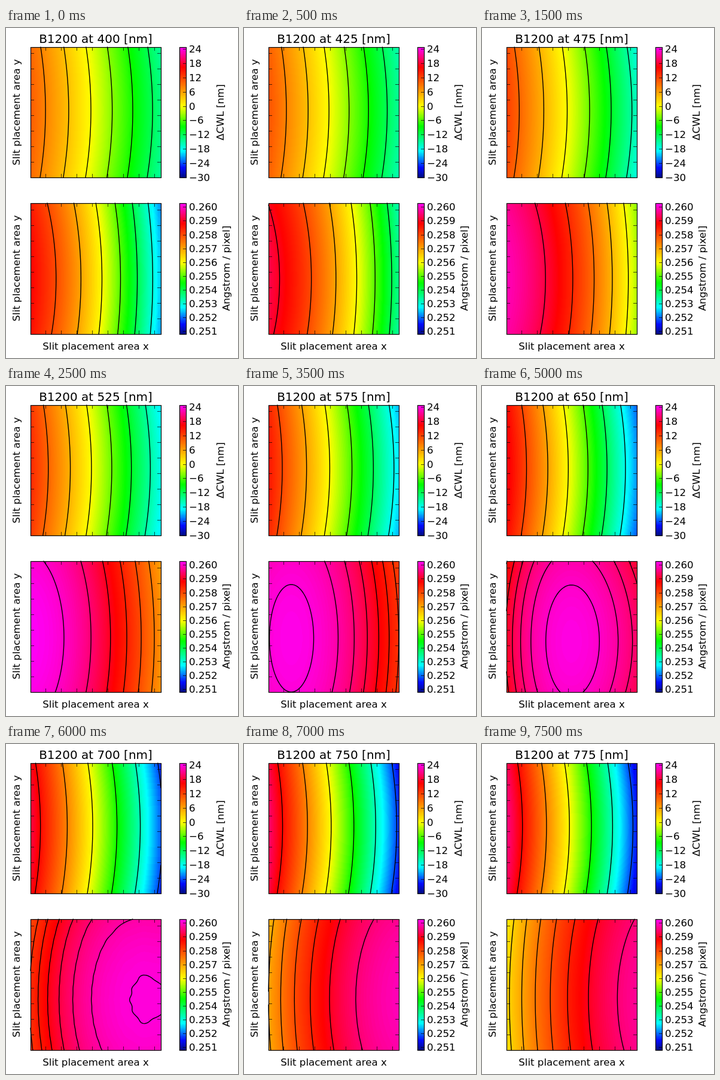
Animation, 388 px wide and 552 px high, one loop 8000 ms. Source, as an HTML page with a canvas:

```html
<!DOCTYPE html>
<html>
<head>
<meta charset="utf-8">
<style>
html, body { margin: 0; width: 100%; height: 100%; overflow: hidden; background: #fff; }
canvas { display: block; }
</style>
</head>
<body>
<canvas id="stage" width="388" height="552"></canvas>
<script>
const ctx = document.getElementById('stage').getContext('2d');
const LEFT = 41, WIDTH = 218, FONT = '"DejaVu Sans", Verdana, sans-serif';

// colour map: position, red, green, blue
const STOPS = [
  [0, 0, 12, 128], [.075, 0, 10, 255], [.205, 0, 255, 255], [.39, 0, 255, 0],
  [.545, 255, 255, 0], [.845, 255, 0, 0], [1, 255, 0, 250]
];

// dispersion model: wavelength, peak, peak x, peak y, then
// quadratic x, cubic x, quadratic y and ripple strengths
const MODEL = [
  [400, .26003, -104, 420, 5.76e-8, 0, 1.9e-8, 0],
  [475, .26011, -17, 420, 6e-8, 0, 1.5e-8, 0],
  [525, .260284, 31, 421, 6.8e-8, 4.1e-11, 1.32e-8, 0],
  [575, .260193, 79, 422, 6.8e-8, 5.25e-11, 1.15e-8, 0],
  [650, .260155, 149.6, 427, 7.8e-8, 1.48e-10, 1.75e-8, 0],
  [700, .260125, 235, 427, 3e-8, 9e-11, 1.7e-8, 2e-6],
  [775, .25984, 311, 425, 4.75e-8, 0, 1.1e-8, 0]
];

// linear interpolation in rows keyed by their first entry
function lookup(rows, key) {
  let i = 1;
  while (i < rows.length - 1 && rows[i][0] < key) i++;
  const a = rows[i - 1], b = rows[i];
  const t = Math.max(0, Math.min(1, (key - a[0]) / (b[0] - a[0])));
  return a.slice(1).map((v, j) => v + (b[j + 1] - v) * t);
}

const PALETTE = Array.from({ length: 256 }, (_, i) => lookup(STOPS, i / 255));

function shiftField(nm) {
  const t = (nm - 400) / 375, x0 = 142 + 2 * t + 2.2 * t * t;
  return (x, y) => {
    const u = x - x0 + .00072 * (y - 138) ** 2;
    return -.000275 * nm * (u + .00056 * u * u);
  };
}

function dispersionField(nm) {
  const [peak, px, py, q, c, p, r] = lookup(MODEL, nm);
  return (x, y) => {
    const w = x - px;
    return peak - q * w * w + c * w ** 3 - p * (y - py) ** 2
      + r * (Math.cos((x - 228) / 5) + Math.cos((y - 428) / 3.2));
  };
}

const PANELS = [
  { top: 32, height: 218, lo: -30, hi: 25, field: shiftField, first: -30, gap: 6,
    digits: 0, label: 'ΔCWL [nm]', labelX: 364, ticks: 42 },
  { top: 293, height: 219, lo: .2508, hi: .2603, field: dispersionField, first: .251, gap: .001,
    digits: 3, label: 'Angstrom / pixel]', labelX: 374, ticks: 304 }
];

function text(str, x, y, size = 16.67, align = 'center', turn = 0) {
  ctx.save();
  ctx.translate(x, y);
  ctx.rotate(turn);
  ctx.font = `${size}px ${FONT}`;
  ctx.textAlign = align;
  ctx.fillStyle = '#000';
  ctx.fillText(str, 0, 0);
  ctx.restore();
}

function line(x1, y1, x2, y2) {
  ctx.moveTo(x1, y1);
  ctx.lineTo(x2, y2);
}

function paint(x, w, value, { top, height, lo, hi }) {
  const img = ctx.createImageData(w, height);
  for (let j = 0, n = 0; j < height; j++) {
    for (let i = 0; i < w; i++) {
      const f = (value(x + i + .5, top + j + .5) - lo) / (hi - lo);
      const rgb = PALETTE[Math.max(0, Math.min(255, Math.round(f * 255)))];
      for (const v of rgb) img.data[n++] = v;
      img.data[n++] = 255;
    }
  }
  ctx.putImageData(img, x, top);
}

// smallest round step that leaves about seven intervals
function niceStep(range) {
  const raw = .99 * range / 7, unit = 10 ** Math.floor(Math.log10(raw));
  return unit * [1, 1.5, 2, 2.5, 3, 4, 5, 6, 8, 10].find(s => s * unit >= raw);
}

function contours(value, { top, height }) {
  const n = 109;
  const at = i => LEFT + i * WIDTH / n, down = j => top + j * height / n;
  const grid = [];
  for (let j = 0; j <= n; j++) {
    grid.push(Array.from({ length: n + 1 }, (_, i) => value(at(i), down(j))));
  }
  const all = grid.flat(), min = Math.min(...all), max = Math.max(...all);
  const step = niceStep(max - min);
  ctx.beginPath();
  for (let k = Math.ceil(min / step); k * step < max; k++) {
    const level = k * step;
    for (let j = 0; j < n; j++) {
      for (let i = 0; i < n; i++) {
        const corners = [[i, j], [i + 1, j], [i + 1, j + 1], [i, j + 1]];
        const hits = [];
        corners.forEach(([ai, aj], m) => {
          const [bi, bj] = corners[(m + 1) % 4];
          const a = grid[aj][ai] - level, b = grid[bj][bi] - level;
          if (a < 0 === b < 0) return;
          const t = a / (a - b);
          hits.push([at(ai + (bi - ai) * t), down(aj + (bj - aj) * t)]);
        });
        for (let h = 0; h + 1 < hits.length; h += 2) line(...hits[h], ...hits[h + 1]);
      }
    }
  }
  ctx.lineWidth = 1.4;
  ctx.lineCap = 'round';
  ctx.stroke();
  ctx.lineCap = 'butt';
}

function drawPanel(panel, nm) {
  const { top, height, lo, hi } = panel, bottom = top + height, right = LEFT + WIDTH;
  const value = panel.field(nm);
  paint(LEFT, WIDTH, value, panel);
  paint(291, 10, (_, y) => hi - (y - top) / height * (hi - lo), panel);
  ctx.strokeStyle = '#000';
  contours(value, panel);

  ctx.beginPath();
  for (let i = 0; i < 8; i++) {
    const x = 66.5 + 26 * i, y = panel.ticks + .5 + 26 * i;
    line(x, top, x, top + 6);
    line(x, bottom, x, bottom - 6);
    line(LEFT, y, LEFT + 6, y);
    line(right, y, right - 6, y);
  }
  for (let i = 0; i < 10; i++) {
    const v = panel.first + i * panel.gap;
    const y = Math.floor(top + height * (hi - v) / (hi - lo));
    line(296, y + .5, 301, y + .5);
    text(v.toFixed(panel.digits).replace('-', '−'), 306, y + 6, 16.67, 'left');
  }
  ctx.lineWidth = .7;
  ctx.stroke();

  ctx.lineWidth = 1.2;
  ctx.strokeRect(LEFT + .5, top + .5, WIDTH, height);
  ctx.strokeRect(290.5, top + .5, 11, height);
  text('Slit placement area y', 23, top + 109, 16.67, 'center', -Math.PI / 2);
  text(panel.label, panel.labelX, top + 109, 16.67, 'center', -Math.PI / 2);
}

function draw(nm) {
  ctx.fillStyle = '#fff';
  ctx.fillRect(0, 0, 388, 552);
  PANELS.forEach(panel => drawPanel(panel, nm));
  text(`B1200 at ${nm} [nm]`, 150, 25, 20);
  text('Slit placement area x', 150, 538);
}

let shown = -1;
function tick() {
  const step = Math.floor(performance.now() % 8000 / 500);
  if (step !== shown) draw(400 + 25 * (shown = step));
  requestAnimationFrame(tick);
}
tick();
</script>
</body>
</html>
```
